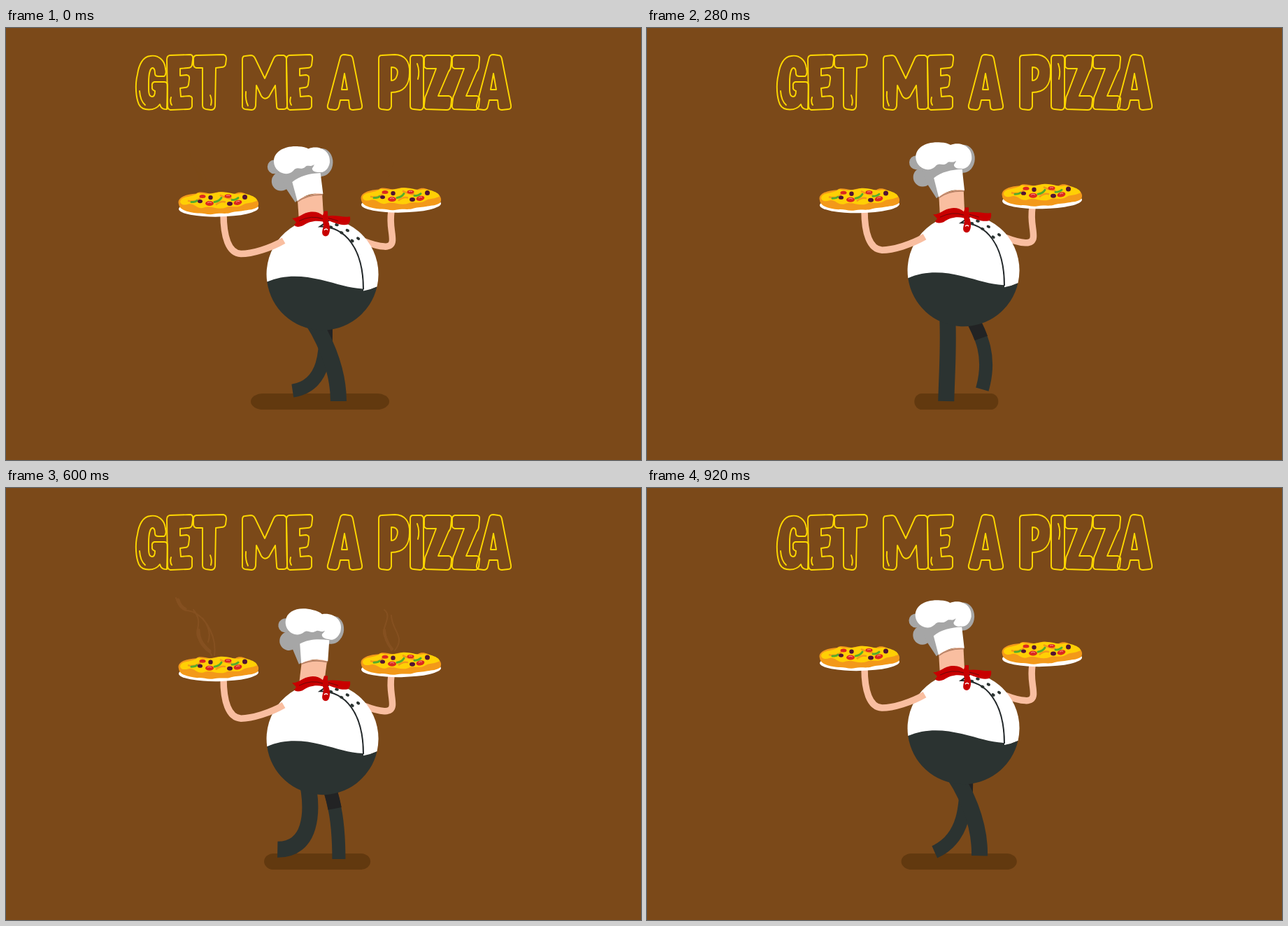
An HTML page that plays this animation: 908 by 617 pixels, repeating every 960 ms.

```html
<!DOCTYPE html>
<html lang="en">
<head>
<meta charset="utf-8">
<title>Get me a pizza</title>
<style>
  html, body { margin: 0; width: 100%; height: 100%; overflow: hidden; background: #7b4919; }
  svg { display: block; width: 908px; height: 617px; }
  .title { fill: none; stroke: #ffd800; stroke-width: 1.9; stroke-linejoin: round; stroke-linecap: round; }
  .leg { fill: none; stroke: #2b3331; }
  .arm { fill: none; stroke: #f9bea0; stroke-width: 9.5; }
  .skin { fill: #f9bea0; }
  .dark { fill: #2b3331; }
  .line { fill: none; stroke: #23282a; stroke-width: 2; }
  .white { fill: #fff; }
  .grey { fill: #a6a6a6; }
  .red { fill: #c80000; }
  .smoke { fill: none; stroke-linecap: round; }
</style>
</head>
<body>
<svg viewBox="0 0 908 617">
  <defs>
    <path id="E" d="M234,39 L264,38 Q268,39 267,45 L266,53 Q265,57 260,57 L249,58 L249,68 L258,67 Q263,68 262,73 L261,81 Q260,85 256,85 L249,86 L250,98 L262,97 Q267,98 266,103 L266,112 Q265,116 260,116 L235,117 Q231,116 231,111 L230,45 Q230,40 234,39Z M236,99 q-2,7 1,11"/>
    <path id="A" d="M478,42 Q479,38 484,38 L491,39 Q495,39 496,44 L509,110 Q510,116 505,116 L496,117 Q491,117 491,112 L490,103 L478,103 L476,112 Q475,117 470,117 L463,116 Q459,115 460,110Z M484,65 L480,88 L488,88Z"/>
    <path id="Z" d="M602,39 L634,39 Q638,40 637,45 L636,55 Q636,59 633,62 L618,97 L633,97 Q638,98 637,103 L636,112 Q635,117 630,117 L601,116 Q597,115 598,110 L599,101 Q599,98 601,95 L615,58 L602,58 Q597,57 598,52 L598,44 Q598,40 602,39Z"/>
    <g id="pizza">
      <ellipse class="white" cx="304" cy="258" rx="57" ry="12" transform="rotate(-1 304 258)"/>
      <path fill="#f39919" d="M247,252 C244,243 256,238 272,237 C276,233 285,236 292,237 C300,236 303,234 310,235 C318,236 320,238 328,237 C334,233 343,236 349,241 C360,243 363,250 360,256 C355,260 348,260 342,261 C334,263 328,262 322,264 C314,267 306,264 298,266 C288,268 282,264 274,265 C262,264 248,261 247,252Z"/>
      <path fill="#ffcf05" d="M249,248 C251,240 265,243 275,236 C285,239 297,237 304,235 C318,233 328,240 335,237 C347,237 359,242 359,247 C353,251 344,249 337,254 C330,258 322,253 314,257 C302,261 294,253 283,257 C273,260 270,250 261,252 C255,254 249,253 249,248Z"/>
      <path fill="none" stroke="#f39919" stroke-width="2.500" d="M260,247 q12,3 18,-4 M334,257 q15,-2 23,-8 M300,253 q7,-6 14,-4 M306,239 q10,5 17,5"/>
      <path fill="none" stroke="#55ac2d" stroke-width="3" stroke-linecap="round" d="M298,249 q7,-1 10,-6 M323,246 q6,0 9,-3 M265,249 q6,0 8,-2"/>
      <g fill="#dc2820">
        <ellipse cx="281" cy="241" rx="4.500" ry="2.500"/><ellipse cx="291" cy="251" rx="6" ry="3.500"/>
        <ellipse cx="317.500" cy="240.500" rx="5" ry="2.600"/><ellipse cx="331.500" cy="249.800" rx="6" ry="3.500" transform="rotate(-12 331 250)"/>
      </g>
      <g fill="#511334">
        <circle cx="292.500" cy="242.500" r="3.200"/><ellipse cx="277.500" cy="248" rx="3.500" ry="2.600"/>
        <circle cx="341.500" cy="241.800" r="3.500"/><ellipse cx="320" cy="251.500" rx="4" ry="3"/>
      </g>
      <path fill="none" stroke="#f3a08c" d="M288,250 q3,-2 6,0 M329,249 q3,-2 5,-1 M315,240 q3,-1 5,0"/>
    </g>
  </defs>

  <g class="title" role="img" aria-label="GET ME A PIZZA">
    <path d="M206,40 C196,41 190,52 188,66 C184,82 186,100 190,109 C195,119 213,119 220,109 Q222,117 230,116 L231,82 Q231,77 226,77 L212,77 Q208,78 209,84 Q208,88 213,90 Q213,98 209,98 C203,98 204,88 204,78 C204,66 206,57 210,57 Q213,58 213,65 Q213,69 218,69 L226,69 Q230,66 228,58 C227,46 218,38 206,40Z M191,90 q1,14 8,20"/>
    <use href="#E"/>
    <path d="M272,39 L311,38 Q315,39 315,44 L314,52 Q313,56 308,56 L300,57 L299,112 Q298,117 293,117 L286,116 Q281,115 281,110 L281,57 L272,57 Q268,56 268,51 L268,44 Q268,40 272,39Z M292,96 q3,7 1,14"/>
    <path d="M342,40 L350,39 Q354,39 356,43 L370,72 L383,43 Q385,39 390,39 L397,39 Q401,40 401,45 L402,111 Q402,116 397,116 L391,116 Q387,116 387,111 L385,82 L376,98 Q370,104 365,97 L358,82 L357,111 Q356,117 351,117 L342,116 Q337,115 338,110 L338,45 Q338,40 342,40Z M343,91 q-1,12 3,20"/>
    <use href="#E" x="171"/>
    <use href="#A"/>
    <path d="M537,39 L556,38 C570,38 578,48 577,64 C577,82 568,92 551,92 L551,112 Q550,117 545,117 L537,116 Q532,115 533,110 L533,44 Q533,39 537,39Z M551,56 C560,56 561,62 559,68 Q557,75 551,75Z"/>
    <path d="M582,39 L592,39 Q597,39 597,44 L597,111 Q597,117 592,117 L583,116 Q578,116 578,111 L578,44 Q578,39 582,39Z M588,51 q4,11 1,22"/>
    <use href="#Z"/>
    <use href="#Z" x="40"/>
    <use href="#A" x="213"/>
  </g>

  <rect id="shadow" y="522" height="23" ry="11.500" fill="#62390f"/>
  <g id="wisps" class="smoke" stroke="#8f6a08">
    <path stroke-width="1.500" d="M262,177 C266,195 274,203 276,216 Q280,230 288,237 M272,197 q12,8 15,22 q8,10 9,18"/>
    <path stroke-width="4" d="M277,207 q2,16 13,27"/>
    <path stroke-width="1.500" d="M543,205 q8,-2 4,7 M554,193 l-1,4"/>
  </g>
  <g id="plume" class="smoke" stroke="#a96a38">
    <path stroke-width="2" d="M243,157 q4,14 15,18 C280,176 302,207 298,239 M268,174 C285,195 265,205 278,218 Q288,227 294,239 M281,186 q14,17 8,34"/>
    <path stroke-width="5" d="M246,160 q3,10 10,13 M275,203 q0,18 16,30"/>
    <path stroke-width="2" d="M541,174 C555,185 530,205 545,216 L551,232 M551,182 C551,203 572,212 556,232"/>
    <path stroke-width="4" d="M541,203 q1,16 11,27"/>
  </g>

  <path id="back" class="leg" stroke-width="19"/>
  <path id="thigh" class="leg" stroke-width="19.500" style="stroke:#222324" stroke-dasharray="49 999"/>
  <path id="front" class="leg" stroke-width="23"/>

  <g id="body">
    <path class="arm" d="M551,262 C548,282 553,292 552.500,304 Q552,313 541,312.500 Q530,312 512,305"/>
    <path class="white" d="M373.300,363 A80,80 0 1 1 530.500,370 L511,378Z"/>
    <path class="dark" d="M373.300,363 C398,352 425,354 450,360 S490,372 511,373 L511,376 Q522,374 530.500,370 A80,80 0 0 1 373.300,363Z"/>
    <path class="line" d="M462,275 L449,284 C486,284 511,316 511,374"/>
    <g id="dots" class="dark"></g>
    <path class="arm" d="M397,304 C378,315 352,323 336,323 C318,322 311,298 311,266"/>
    <use href="#pizza"/>
    <use href="#pizza" x="261" y="-6"/>
    <g id="head">
      <path class="skin" d="M416,244 L451,234 L454,270 L419,276Z"/>
      <path fill="none" stroke="#b98468" stroke-width="2" d="M416,249 Q430,238 452,238"/>
      <g class="grey">
        <circle cx="382" cy="200" r="10"/><circle cx="392" cy="220.500" r="13.500"/>
        <ellipse cx="449" cy="192" rx="16.500" ry="20"/>
        <path d="M386,200 L452,190 L449,213 L415,222 L417,246 L413,250 L399,230Z"/>
      </g>
      <path class="white" d="M408,221 C418,212 433,208 448,207 L452.500,237 C440,235 426,239 416,248Z"/>
      <path class="white" d="M381,193 C380,178 396,169 416,170 Q425,170 430,173 C444,167 462,174 461,192 C459,203 452,207 447,206 C441,207 436,205 436,201 Q438,198 439,195 C433,200 430,195 426,199 C419,205 415,197 409,205 C399,215 382,207 381,193Z"/>
    </g>
    <path class="red" d="M409,272 C418,273 424,264 436,263 Q446,262 453,268 L455,262 L460,262 L460,269 C470,267 481,271 492,270 Q493,277 489,281 C479,283 470,279 460,275 C465,284 463,293 461,296 Q457,300 453,296 C450,290 456,285 453,277 C443,275 434,276 424,283 Q415,286 412,282 L415,278Z"/>
    <path fill="none" stroke="#6d0a0a" d="M419,276 Q437,267 453,273 M461,272 q8,2 14,4"/>
    <path fill="none" stroke="#fff" stroke-width="1.500" d="M455,289 q3,-3 5,0"/>
  </g>
</svg>
<script>
const LOOP = 960, STEP = 40, SECOND_STEP = 496;
const $ = id => document.getElementById(id);
const cos = deg => Math.cos(deg * Math.PI / 180);
const sin = deg => Math.sin(deg * Math.PI / 180);

// Mean plus two harmonics
const wave = (deg, [mean, a, b, c, d]) =>
  mean + a * cos(deg) + b * sin(deg) + c * cos(2 * deg) + d * sin(2 * deg);

// Smooth pulse, 1 at its centre
const pulse = (deg, centre, sharp) => ((1 + cos(deg - centre)) / 2) ** sharp;

// Angles are degrees of the whole walk cycle
const legs = {
  front: { hip: 429, ground: 533, lift: 17, swing: 130, curl: 225, foot: [430.5, 46.9, 5.1, -2, -5.5] },
  back: { hip: 456, ground: 530, lift: 15, swing: 310, curl: 22, foot: [455.5, -38.7, 7, -7, -2] }
};

function legPath({ hip, ground, lift, swing, curl, foot }, deg, bob) {
  const s = (deg - swing + 360) % 360, top = 405 + bob;
  const x = wave(deg, foot);
  const y = ground - (s < 230 ? lift * Math.sqrt(sin(s / 230 * 180)) : 0);
  const bend = 91 * pulse(deg, curl, 3);
  const knee = [hip + 14 - 13 * cos(s - 10), top + 45 + 13 * cos(s - 50)];
  const ankle = [x + 47 * sin(bend), y - 47 * cos(bend)];
  return `M${hip},${top} C${knee} ${ankle} ${x},${y}`;
}

// Shrinks slowly after each footfall, spreads quickly before the next
function shadowWidth(u) {
  const shrink = Math.max(0, 1 - 2 * u) ** 1.5;
  const spread = Math.min(1, Math.max(0, (u - .85) / .11));
  return 120 + 78 * Math.max(shrink, spread);
}

const set = (id, attrs) => {
  for (const name in attrs) $(id).setAttribute(name, attrs[name]);
};

function draw(t) {
  const deg = t / LOOP * 360;
  const u = t < SECOND_STEP ? t / SECOND_STEP : (t - SECOND_STEP) / (LOOP - SECOND_STEP);
  const bob = wave(u * 360, [-3.4, .3, 11.9, 2.7, 1]);
  const lean = wave(deg - 41, [5.5, -5.7, 0, 1.2, 0]);
  const w = shadowWidth(u);
  const behind = legPath(legs.back, deg, bob);
  const drift = (t - 600) / 120;

  set("body", { transform: `translate(0 ${bob})` });
  set("head", { transform: `rotate(${lean} 436 275)` });
  set("shadow", { x: 439 - w * .414 - 7, width: w, rx: w * .09 });
  set("back", { d: behind });
  set("thigh", { d: behind });
  set("front", { d: legPath(legs.front, deg, bob) });
  set("wisps", { opacity: .35 * pulse(deg, 45, 20) });
  set("plume", { opacity: .35 * pulse(deg, 248, 10), transform: `translate(${-4 * drift} ${-9 * drift})` });
}

// Three pairs of buttons down the jacket
for (let i = 0; i < 6; i++) {
  const row = i >> 1, side = i & 1;
  const x = 473 + 15.3 * row - 8.5 * side, y = 281.5 + 6.2 * row + 1.8 * row * row + 3.3 * side;
  $("dots").innerHTML += `<ellipse cx="${x}" cy="${y}" rx="2.8" ry="2" transform="rotate(${15 + 10 * row} ${x} ${y})"/>`;
}

const start = performance.now();
function tick() {
  const t = Math.max(0, performance.now() - start) % LOOP;
  draw(Math.floor(t / STEP) * STEP);
  requestAnimationFrame(tick);
}
tick();
</script>
</body>
</html>
```
